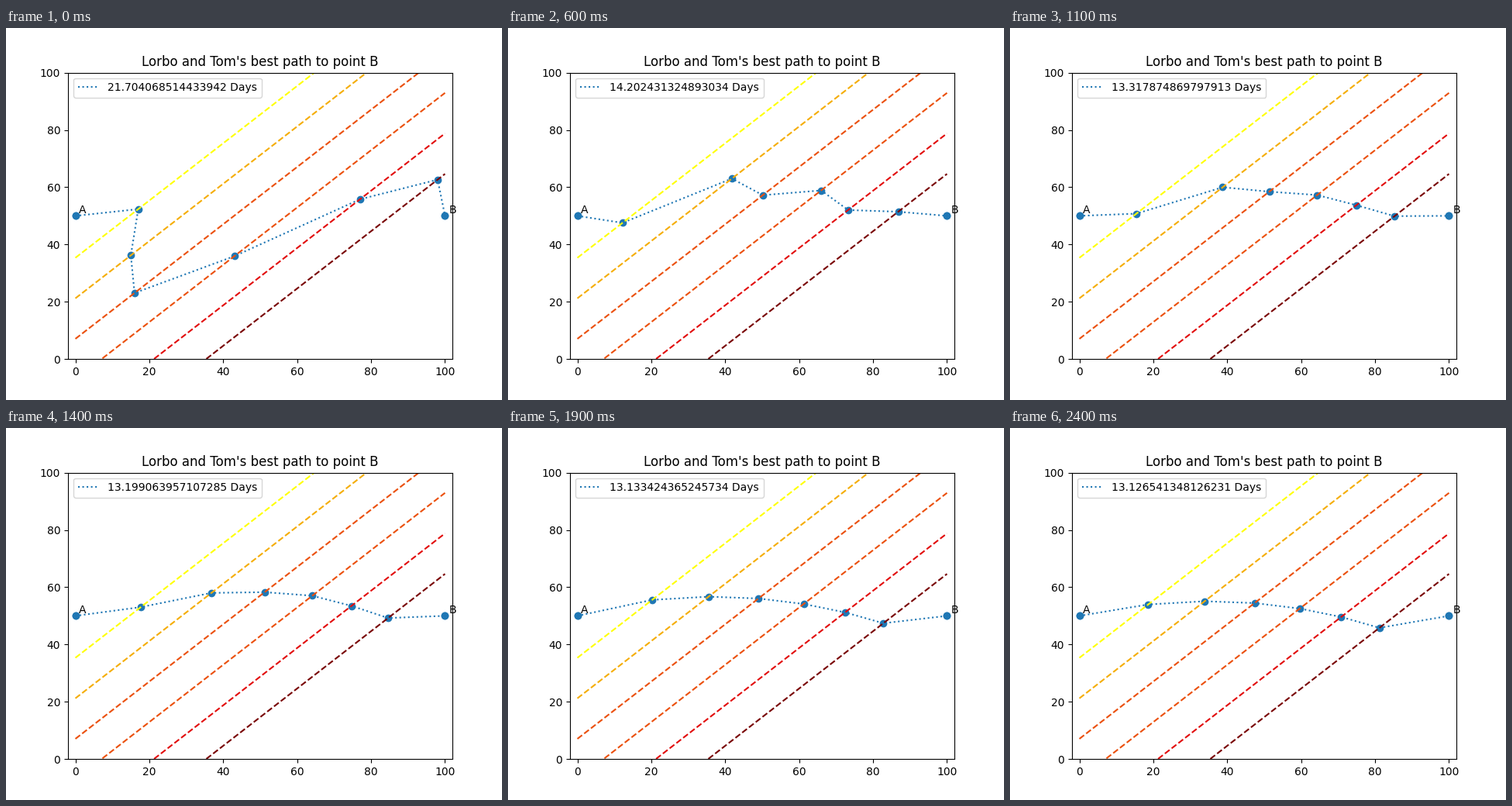
A matplotlib script that plays this animation: 640x480 px, repeating every 7400 ms.

```python
import matplotlib.pyplot as plt
import numpy as np
from matplotlib.animation import FuncAnimation

STEP_MS = 100
LOOP_FRAMES = 74
SETTLE = 3       # steps the first big improvement takes
LAST_STEP = 24

# Five strips, each ten wide and slower than the last, cross the way at 45 degrees.
ROOT2 = np.sqrt(2)
EDGE = (100 / ROOT2 - 50) / 2
WIDTHS = np.array([EDGE] + [10] * 5 + [EDGE])
SPEEDS = np.array([10, *range(9, 4, -1), 10])
BORDERS = 50 - ROOT2 * np.cumsum(WIDTHS)[:-1]
COLORS = ["#ffff00", "#f5ad05", "#eb4f0c", "#eb4f0c", "#e20a0a", "#780000"]


def quickest_crossings():
    """Snell's law: sin(angle) / speed is the same in every strip."""
    low, high = 0, 1 / SPEEDS.max()
    for _ in range(50):
        ratio = (low + high) / 2
        drift = WIDTHS * np.tan(np.arcsin(ratio * SPEEDS))
        if drift.sum() < 100 / ROOT2:
            low = ratio
        else:
            high = ratio
    return np.cumsum(WIDTHS + drift)[:-1] / ROOT2


# The search starts from a rough guess, straightens it, then slides to the best.
BEST = quickest_crossings()
WAYPOINTS = {
    0: [17, 15, 16, 43, 77, 98],
    SETTLE: [10.5, 43.5, 48.8, 67.4, 71.4, 87.9],
    9: [13.9, 40.1, 51.5, 64.5, 75.1, 85.7],
    14: [17.7, 36.8, 51.2, 64.1, 74.7, 84.6],
    19: BEST + 1.5,
    LAST_STEP: BEST - 0.1,
}


def crossings_at(step):
    if step < SETTLE:
        step = SETTLE * (1 - (1 - step / SETTLE) ** 2)
    return np.array([np.interp(step, list(WAYPOINTS), xs)
                     for xs in zip(*WAYPOINTS.values())])


def route(crossings):
    x = np.array([0, *crossings, 100])
    y = np.array([50, *(crossings + BORDERS), 50])
    return x, y


fig, ax = plt.subplots(figsize=(6.4, 4.8), dpi=100)
ax.set(xlim=(-2, 102), ylim=(0, 100))
ax.set_title("Lorbo and Tom's best path to point B")

for x, name in ((0, "A"), (100, "B")):
    ax.scatter(x, 50, color="C0")
    ax.text(x + 1, 51, name)
dots = ax.scatter([], [], color="C0")
path, = ax.plot([], [], ":", color="C0", label="Days")

span = np.array([0, 100])
for border, color in zip(BORDERS, COLORS):
    ax.plot(span, span + border, "--", color=color)
label = ax.legend(loc="upper left").get_texts()[0]


def update(frame):
    x, y = route(crossings_at(min(frame, LAST_STEP)))
    days = np.sum(np.hypot(np.diff(x), np.diff(y)) / SPEEDS)
    path.set_data(x, y)
    dots.set_offsets(np.column_stack([x, y]))
    label.set_text(f"{days:.15f} Days")
    return path, dots, label


anim = FuncAnimation(fig, update, frames=LOOP_FRAMES, interval=STEP_MS,
                     repeat=True, repeat_delay=0)
plt.show()
```
